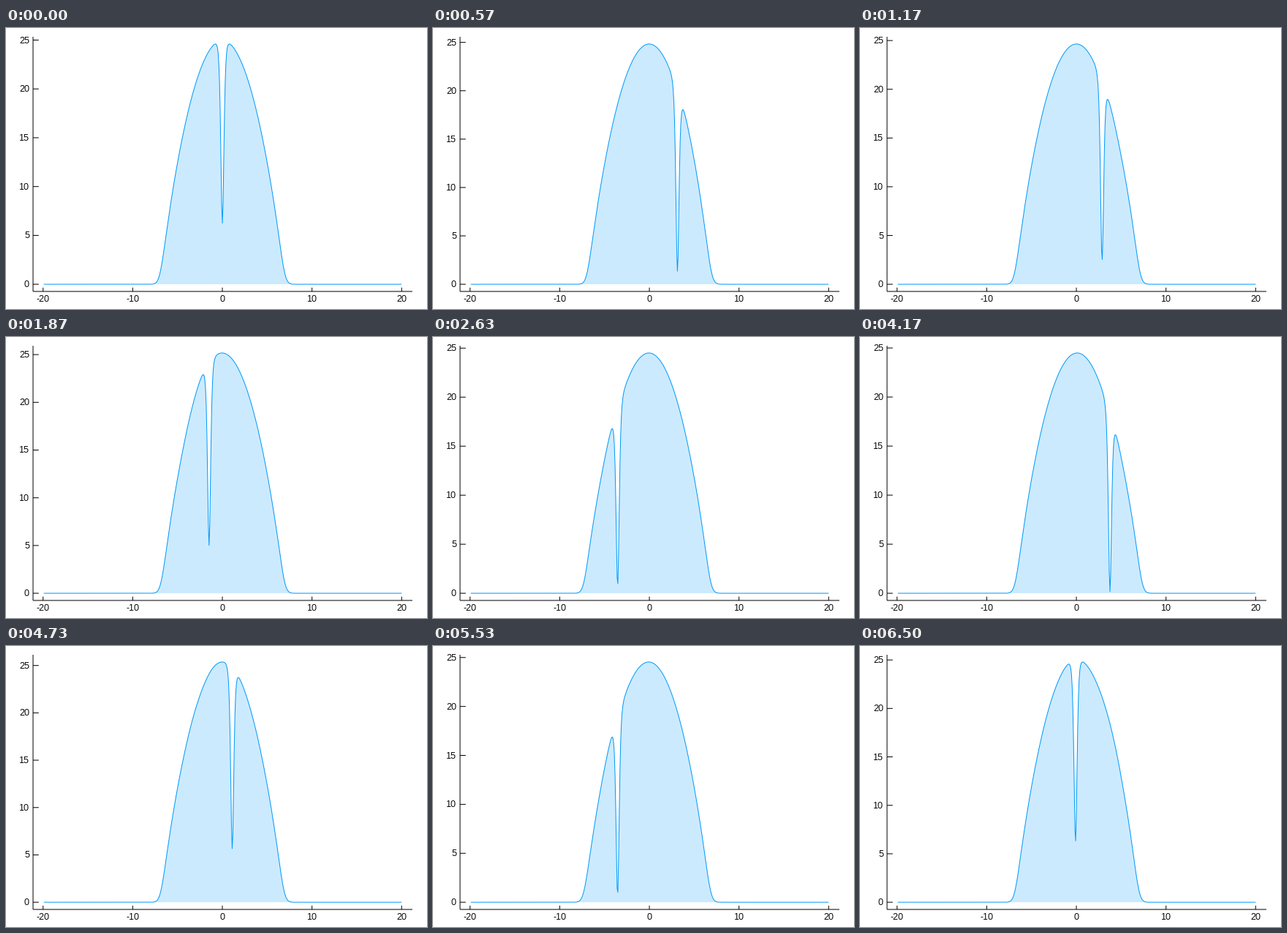
A matplotlib script that plays this animation: 576x384 px, repeating every 6.53 s.

```python
"""Grey soliton oscillating in a harmonically trapped 1D quantum gas."""
import numpy as np
import matplotlib.pyplot as plt
from matplotlib.animation import FuncAnimation
from matplotlib.patches import Polygon

W, H, DPI = 576, 384, 100
PICTURES, LOOP_MS = 196, 6530
TICK_MS, FPS = 10, 30               # 30 pictures a second on a 10 ms clock
LEFT, RIGHT, TOP, BOTTOM = 37, 556, 12, 360
PAD = 0.03
BLUE = "#009AFA"
PX = 72 / DPI

# --- physics: i psi_t = (-d2/2 + x^2/2 + |psi|^2 - mu) psi ---
MU, SIZE, N = 25.0, 40.0, 512
x = np.linspace(-SIZE / 2, SIZE / 2, N + 1)[1:]
k = 2 * np.pi * np.fft.fftfreq(N, SIZE / N)
trap = x**2 / 2
T_END = 8 * np.pi / np.sqrt(2)      # two nominal soliton periods


def ground_state(h=0.002, steps=4000):
    psi = np.sqrt(np.maximum(MU - trap, 0))
    kin = np.exp(-h * k**2 / 2)
    for _ in range(steps):
        half = np.exp(-h / 2 * (trap + psi**2 - MU))
        psi = np.fft.ifft(kin * np.fft.fft(half * psi)).real
        psi = psi * np.exp(-h / 2 * (trap + psi**2 - MU))
    return psi


def evolve(psi, step, count, sub=40):
    """Split-step evolution; returns the density at each multiple of step."""
    h = step / sub
    kin = np.exp(-0.5j * h * k**2)

    def kick(p, dt):
        return p * np.exp(-1j * dt * (trap + np.abs(p)**2 - MU))

    rows = [np.abs(psi)**2]
    psi = kick(psi, h / 2)
    for _ in range(count - 1):
        for _ in range(sub):
            psi = kick(np.fft.ifft(kin * np.fft.fft(psi)), h)
        rows.append(np.abs(psi)**2)
    return np.array(rows)


def second_return(rows):
    """Fractional row at which the notch comes back to x = 0 for good."""
    w = np.maximum(0.6 * MU - rows, 0) * (np.abs(x) < 4)
    pos = (w * x).sum(axis=1) / w.sum(axis=1)
    i = next(j for j in range(150, len(pos)) if pos[j - 1] < 0 <= pos[j])
    return i - 1 - pos[i - 1] / (pos[i] - pos[i - 1])


speed = 0.5
depth = np.sqrt(1 - speed**2)
start = ground_state() * (depth * np.tanh(depth * np.sqrt(MU) * x) + 1j * speed)

# The loop stops just before the notch is back in the middle.
trial = 199
density = evolve(start, T_END / trial, 216)
steps = round(trial * (PICTURES - 0.65) / second_return(density))
if steps != trial:
    density = evolve(start, T_END / steps, PICTURES)

# --- drawing, in pixel coordinates ---
span = x[-1] - x[0]
x_lo, x_hi = x[0] - PAD * span, x[-1] + PAD * span


def to_px(v):
    return LEFT + (v - x_lo) / (x_hi - x_lo) * (RIGHT - LEFT)


def to_py(v, peak):
    return BOTTOM - (v / peak + PAD) / (1 + 2 * PAD) * (BOTTOM - TOP)


plt.rcParams.update({"font.family": "Liberation Sans",
                     "text.hinting": "default",
                     "text.hinting_factor": 1})
fig = plt.figure(figsize=(W / DPI, H / DPI), dpi=DPI, facecolor="white")
ax = fig.add_axes([0, 0, 1, 1])
ax.set_xlim(0, W)
ax.set_ylim(H, 0)
ax.axis("off")


def stroke(xs, ys, color="black", z=3):
    return ax.plot(xs, ys, color=color, lw=PX, zorder=z, snap=False,
                   solid_joinstyle="round", solid_capstyle="butt")[0]


def label(px, py, value, ha):
    return ax.text(px, py, str(value), size=12 * PX, ha=ha, va="baseline")


def segments(a, b):
    """Interleave end points with gaps, so one line draws many ticks."""
    a, b = np.broadcast_arrays(np.asarray(a, float), np.asarray(b, float))
    return np.column_stack([a, b, np.full(a.shape, np.nan)]).ravel()


X_TICK, Y_TICK = 0.015 * (BOTTOM - TOP), 0.015 * (RIGHT - LEFT)
x_vals, y_vals = np.arange(-20, 21, 10), np.arange(0, 26, 5)

stroke([LEFT, LEFT], [TOP, BOTTOM])
stroke([LEFT, RIGHT], [BOTTOM, BOTTOM])
x_at = to_px(x_vals)
stroke(segments(x_at, x_at),
       segments(np.full(x_at.shape, BOTTOM), BOTTOM - X_TICK))
for v, at in zip(x_vals, x_at):
    label(at, 374, v, "center")

y_ticks = stroke(segments(np.full(y_vals.shape, LEFT), LEFT + Y_TICK),
                 np.zeros(3 * len(y_vals)))
y_labels = [label(32, 0, v, "right") for v in y_vals]

px = to_px(x)
area = ax.add_patch(Polygon([[0, 0], [1, 1], [1, 0]], closed=True,
                            facecolor=BLUE, alpha=0.2, lw=0, zorder=1))
curve = stroke([], [], BLUE, 2)


def draw(i):
    n = density[int((i + 0.5) * TICK_MS * FPS / 1000)]
    peak = n.max()
    py = to_py(n, peak)
    base = to_py(0, peak)
    curve.set_data(px, py)
    area.set_xy(np.column_stack([np.r_[px[0], px, px[-1]],
                                 np.r_[base, py, base]]))
    y_at = to_py(y_vals, peak)
    y_ticks.set_ydata(segments(y_at, y_at))
    for text, y in zip(y_labels, y_at):
        text.set_y(y + 4)
    return [curve, area]


anim = FuncAnimation(fig, draw, frames=LOOP_MS // TICK_MS, interval=TICK_MS,
                     repeat=True, repeat_delay=0, blit=False)
plt.show()
```
